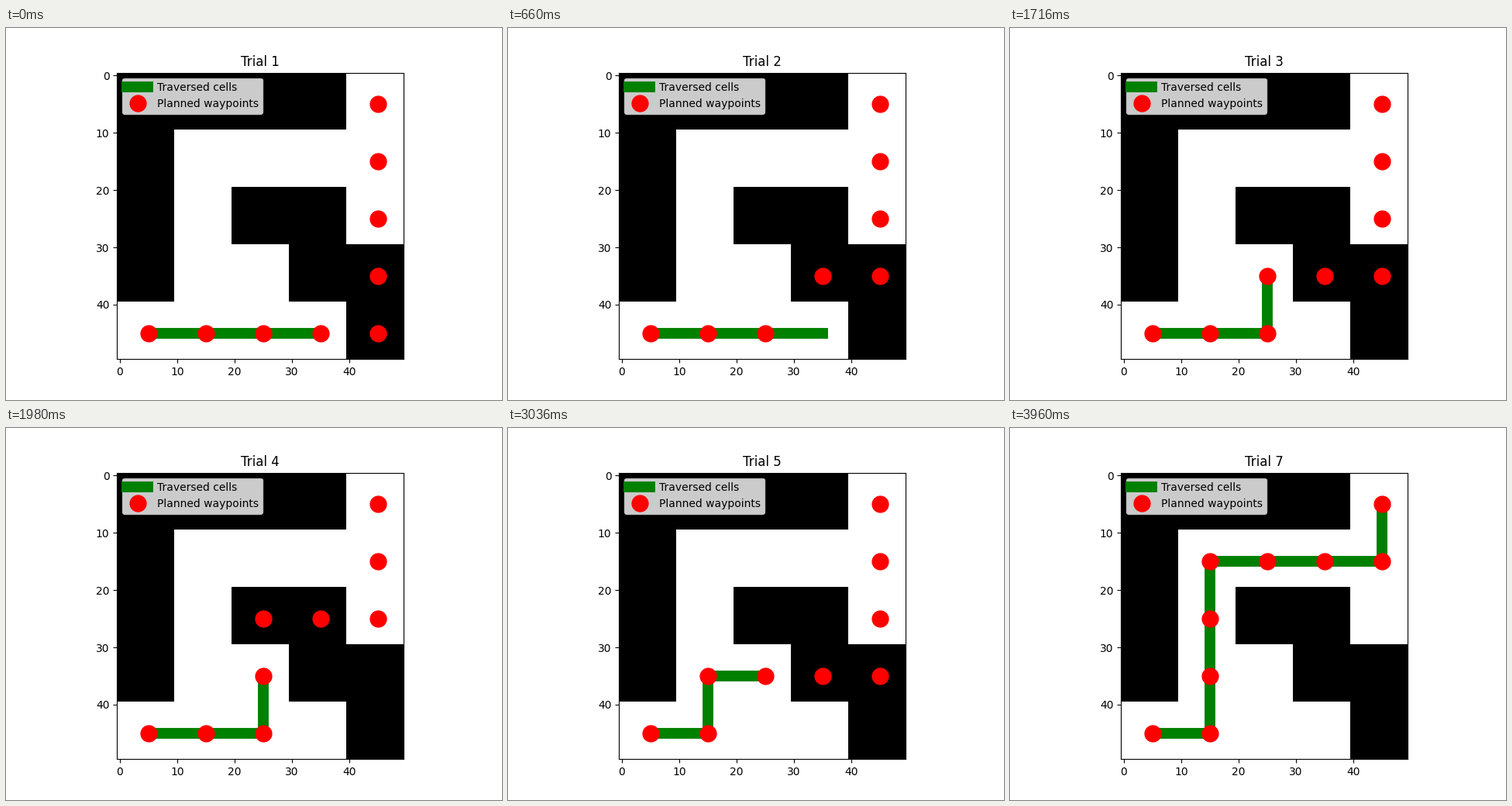
Recreate the animation shown at these times as a matplotlib script. Size 640 by 480 pixels, loop 4620 ms.

```python
import numpy as np
import matplotlib.pyplot as plt
from matplotlib.animation import FuncAnimation

SIZE = 50
CELL = 10
STEP_MS = 660

# Planned moves, number of cells reached, waypoints left unmarked
TRIALS = [
    ("RRRRUUUU", 4, []),
    ("RRRURUUU", 4, [3]),
    ("RRURRUUU", 4, []),
    ("RRUURRUU", 4, []),
    ("RURRRUUU", 4, []),
    ("RUURRRUU", 4, []),
    ("RUUURRRU", 9, []),
]
MOVES = {"R": (CELL, 0), "U": (0, -CELL)}

MAZE = ["####.",
        "#....",
        "#.##.",
        "#..##",
        "....#"]


def route(moves, start=(5, 45)):
    steps = [start] + [MOVES[m] for m in moves]
    return np.cumsum(steps, axis=0)


grid = np.array([[c == "." for c in row] for row in MAZE], dtype=float)
grid = np.kron(grid, np.ones((CELL, CELL)))

fig, ax = plt.subplots(figsize=(6.4, 4.8), dpi=100)
ax.imshow(grid, cmap="gray", vmin=0, vmax=1)
walked, = ax.plot([], [], color="green", linewidth=10, label="Traversed cells")
planned, = ax.plot([], [], "o", color="red", markersize=15,
                   label="Planned waypoints")
ax.set_xlim(-0.5, SIZE - 0.5)
ax.set_ylim(SIZE - 0.5, -0.5)
ax.set_xticks(range(0, SIZE, CELL))
ax.set_yticks(range(0, SIZE, CELL))
ax.legend(loc="upper left")
title = ax.set_title("Trial 1")


def draw(i):
    moves, reached, skipped = TRIALS[i]
    path = route(moves)
    walked.set_data(*path[:reached].T)
    planned.set_data(*np.delete(path, skipped, axis=0).T)
    title.set_text(f"Trial {i + 1}")
    return walked, planned, title


anim = FuncAnimation(fig, draw, frames=len(TRIALS), interval=STEP_MS,
                     repeat=True, repeat_delay=0, blit=False)
plt.show()
```
